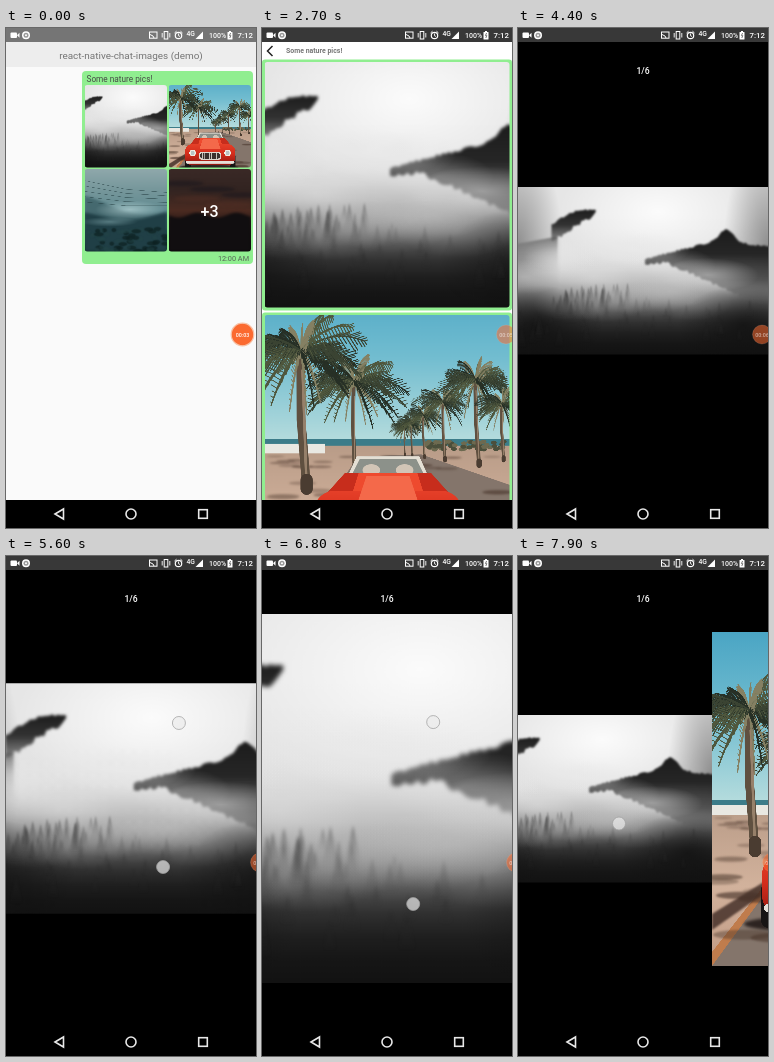
An HTML page with a canvas for the animation above (8 s loop, 250x500 px).

```html
<!DOCTYPE html>
<html lang="en">
<head>
<meta charset="utf-8">
<title>Chat images</title>
<style>
  html, body { margin: 0; width: 100%; height: 100%; overflow: hidden; background: #000; }
  canvas { display: block; width: 250px; height: 500px; }
</style>
</head>
<body>
<canvas id="stage"></canvas>
<script>
const W = 250, H = 500, LOOP = 8000, STEP = 100;
const BAR = 14, NAV = 472, GREEN = '#90ee90', WHITE = '#fff';
const OPEN_LIST = 2100, OPEN_VIEWER = 4000, PINCH = 5100, RELEASE = 6500, SWIPE = 7700;
const stage = document.getElementById('stage');
const dpr = Math.max(1, window.devicePixelRatio || 1);
stage.width = W * dpr;
stage.height = H * dpr;
const ctx = stage.getContext('2d');

const ramp = (t, start, length) => Math.min(1, Math.max(0, (t - start) / length));
const smooth = p => p * p * (3 - 2 * p);
const mix = (a, b, p) => a + (b - a) * p;

function random(seed) {
  return () => (seed = (seed * 16807) % 2147483647) / 2147483647;
}

function trace(c, points) {
  c.beginPath();
  points.forEach(([x, y]) => c.lineTo(x, y));
}

function shape(c, color, points) {
  c.fillStyle = color;
  trace(c, points);
  c.fill();
}

function line(c, color, width, points) {
  c.strokeStyle = color;
  c.lineWidth = width;
  trace(c, points);
  c.stroke();
}

function rect(c, color, x, y, w, h, r = 0) {
  c.fillStyle = color;
  c.beginPath();
  c.roundRect(x, y, w, h, r);
  c.fill();
}

function disc(c, color, x, y, rx, ry = rx) {
  c.fillStyle = color;
  c.beginPath();
  c.ellipse(x, y, rx, ry, 0, 0, 7);
  c.fill();
}

// Area between two curves.
function band(c, color, x0, x1, top, bottom) {
  const upper = [], lower = [];
  for (let x = x0; x <= x1; x += 2) {
    upper.push([x, top(x)]);
    lower.unshift([x, bottom(x)]);
  }
  shape(c, color, upper.concat(lower));
}

function blurred(c, radius, paint) {
  c.filter = `blur(${radius}px)`;
  paint();
  c.filter = 'none';
}

function blend(gradient, colors) {
  colors.forEach((color, i) => gradient.addColorStop(i / (colors.length - 1), color));
  return gradient;
}

const fall = (c, y0, y1, ...colors) => blend(c.createLinearGradient(0, y0, 0, y1), colors);

function glow(c, rgb, alpha, x, y, rx, ry) {
  c.save();
  c.translate(x, y);
  c.scale(rx, ry);
  disc(c, blend(c.createRadialGradient(0, 0, 0, 0, 0, 1),
    [alpha, alpha * 0.5, 0].map(a => `rgba(${rgb},${a})`)), 0, 0, 1);
  c.restore();
}

function text(str, x, y, size, color, { weight = 400, align = 'left' } = {}) {
  ctx.font = `${weight} ${size}px Roboto, sans-serif`;
  ctx.textAlign = align;
  ctx.fillStyle = color;
  ctx.fillText(str, x, y);
}

function makePhoto(w, h, paint) {
  const scale = 3, image = document.createElement('canvas');
  image.width = w * scale;
  image.height = h * scale;
  const c = image.getContext('2d');
  c.scale(scale, scale);
  paint(c, w, h);
  return { image, w, h, scale };
}

function paintMist(c, w, h) {
  const rnd = random(71);
  const rough = size => (rnd() - 0.5) * size;
  const greys = Array.from({ length: 17 }, (_, i) => {
    const v = 15 + 215 / (1 + Math.exp((i / 16 - 0.68) * 13));
    return `rgb(${v},${v},${v})`;
  });
  rect(c, fall(c, 0, h, ...greys), 0, 0, w, h);
  glow(c, '255,255,255', 0.85, 140, 25, 100, 60);
  for (const x of [0, w]) glow(c, '0,0,0', 0.38, x, 60, 45, 110);
  for (const x of [20, 225]) glow(c, '15,15,15', 0.75, x, 138, 65, 40);

  blurred(c, 3, () => {
    band(c, fall(c, 45, 85, '#666', 'rgba(150,150,150,0)'), -4, 40, x => 57 - x * 0.18, () => 85);
    band(c, fall(c, 22, 55, '#1c1c1c', '#333', 'rgba(90,90,90,.6)'), 34, 78,
      x => 23 + 0.012 * (70 - x) ** 2 + rough(2), x => 55 - (x - 34) * 0.64 + rough(5));
    const peak = x => 72 - 17 * ramp(x, 127, 66) - 13 * Math.exp(-(((x - 208) / 9) ** 2)) + 5 * ramp(x, 215, 35);
    band(c, fall(c, 42, 118, '#1c1c1c', '#262626', 'rgba(60,60,60,.75)', 'rgba(100,100,100,0)'), 127, 254,
      x => peak(x) + rough(2), x => 76 + 42 * ramp(x, 150, 90) + rough(4));
  });
  for (let i = 0; i < 10; i++) glow(c, '232,232,232', 0.32, rnd() * 165, 58 + rnd() * 34, 38, 17);
  glow(c, '215,215,215', 0.55, 190, 88, 50, 17);

  blurred(c, 2, () => {
    for (let i = 0; i < 90; i++) {
      const near = i % 2;
      const x = near ? rnd() * w : 35 + rnd() * 75;
      const y = near ? 106 + rnd() * 36 : 93 + rnd() * 18 + Math.abs(x - 95) * 0.15;
      const size = 9 + rnd() * 13, spread = size * 0.22;
      shape(c, fall(c, y, y + size, `rgba(30,30,30,${near ? 0.35 : 0.5})`, 'rgba(50,50,50,0)'),
        [[x, y], [x + spread, y + size], [x - spread, y + size]]);
    }
  });
  for (let i = 0; i < 9; i++) glow(c, '215,215,215', 0.17, 45 + rnd() * 150, 100 + rnd() * 20, 40, 17);
}

function palm(c, x, y, r, baseX, baseY, trunk, seed) {
  const rnd = random(seed);
  c.lineCap = 'round';
  line(c, '#5f5040', trunk, [[x, y], [(x + baseX) / 2 - trunk * 0.3, (y + baseY) / 2], [baseX, baseY]]);
  line(c, '#96806a', trunk * 0.3, [[x + trunk * 0.2, y + r * 0.3], [baseX, baseY]]);
  line(c, '#4a3c31', trunk * 1.4, [[baseX, baseY - trunk], [baseX, baseY]]);
  const colors = ['#273026', '#3b4433', '#50583e', '#858063'], fronds = 26;
  for (let i = 0; i < fronds; i++) {
    const a = i * 2.4 + rnd() * 0.3;
    const len = r * (0.65 + rnd() * 0.5);
    const ex = Math.cos(a) * len, ey = Math.sin(a) * len * 0.75 + r * 0.25;
    const cx = ex * 0.5, cy = ey * 0.5 - r * 0.3;
    const color = colors[i % colors.length];
    let from = [x, y];
    for (let u = 0; u <= 1; u += 1 / 18) {
      const px = x + 2 * u * (1 - u) * cx + u * u * ex;
      const py = y + 2 * u * (1 - u) * cy + u * u * ey;
      const leaf = r * (0.12 + rnd() * 0.16) * Math.sin(Math.PI * (0.15 + u * 0.8));
      line(c, color, r * 0.02, [from, [px, py]]);
      line(c, color, r * 0.017, [[px, py], [px + Math.cos(a) * leaf * 0.7, py + leaf]]);
      line(c, color, r * 0.014, [[px, py], [px + Math.cos(a) * leaf, py - leaf * 0.3]]);
      from = [px, py];
    }
  }
}

function paintCar(c, x) {
  const taper = (color, y0, half0, y1, half1) =>
    shape(c, color, [[x - half0, y0], [x + half0, y0], [x + half1, y1], [x - half1, y1]]);
  const pair = (gap, paint) => [-gap, gap].forEach(dx => paint(x + dx));
  blurred(c, 5, () => disc(c, 'rgba(30,22,20,.85)', x - 4, 292, 90, 9));
  pair(68, px => rect(c, '#171414', px - 9, 250, 18, 46, 8));
  taper('#e4dfd4', 186, 32, 206, 41);
  taper('#8c918a', 189, 29, 205, 37);
  pair(17, px => disc(c, '#d2c5b6', px, 200, 9, 6));
  taper('#c72d1c', 203, 44, 232, 70);
  taper('#ee4a2e', 203, 30, 235, 40);
  rect(c, fall(c, 216, 286, '#e8432b', '#d42d1c', '#8f1710'), x - 76, 221, 152, 64, 22);
  taper('#f4694a', 206, 22, 236, 32);
  pair(53, px => {
    disc(c, '#f0ece3', px, 248, 10);
    disc(c, '#b9c4c4', px, 248, 6);
  });
  rect(c, '#ddd8d0', x - 34, 244, 68, 25, 10);
  rect(c, '#39302e', x - 30, 248, 60, 17, 7);
  for (let dx = -24; dx <= 24; dx += 7) rect(c, '#c9c4bd', x + dx, 248, 2, 17);
  rect(c, '#e4dfd8', x - 74, 272, 148, 8, 4);
}

function paintBeach(c, w, h) {
  const rnd = random(8);
  rect(c, fall(c, 0, 170, '#4aa5c4', '#72bdd0', '#b5dcdd'), 0, 0, w, 172);
  rect(c, '#3c7c89', 0, 168, w, 7);
  rect(c, fall(c, 175, h, '#b99c88', '#d2b29c', '#c09a84'), 0, 175, w, h);
  rect(c, '#e9e8e2', 0, 173, 62, 10);
  shape(c, '#84756b', [[95, 186], [160, 184], [w, 215], [w, h], [0, h], [50, 256]]);
  shape(c, '#c07c4c', [[0, 320], [58, 246], [60, 252], [0, 334]]);
  blurred(c, 3, () => {
    band(c, 'rgba(62,42,36,.8)', 0, 58, x => 282 - x * 0.62, x => 298 - x * 0.7);
    for (let i = 0; i < 45; i++) {
      const depth = rnd() ** 2;
      disc(c, `rgba(72,52,42,${0.25 + rnd() * 0.4})`, rnd() * w, 186 + depth * 120, 9 + depth * 22, 1 + depth * 4);
    }
  });
  // Scrub along the shore.
  for (let i = 0; i < 70; i++) disc(c, i % 2 ? '#4b4f3b' : '#6d6a50', 165 + rnd() * 85, 171 + rnd() * 8, 3, 2);

  for (let i = 4; i >= 0; i--) {
    const k = 0.6 ** i, x = 132 + 83 * k;
    palm(c, x, 164 - 57 * k, 12 + 28 * k, x + 4 * k, 183 + 12 * k, 1 + 3 * k, 33 + i);
  }
  palm(c, 242, 132, 30, 244, 190, 3, 21);
  palm(c, 91, 109, 54, 92, 200, 4, 52);
  palm(c, 37, 78, 68, 43, 219, 9, 64);
  paintCar(c, 126);
}

function paintStorm(c, w, h) {
  const rnd = random(12);
  rect(c, fall(c, 0, h, '#8fa8ab', '#76979b', '#628b91', '#2d5159', '#0d2023'), 0, 0, w, h);
  blurred(c, 10, () => {
    band(c, '#45696f', 0, w, x => 85 + 26 * Math.sin(x / 60 - 0.9), () => 145);
    band(c, '#203f46', 0, w, x => 114 + 10 * Math.sin(x / 40 - 1), () => h);
  });
  glow(c, '180,210,212', 0.7, 110, 98, 85, 22);
  glow(c, '140,180,185', 0.5, 60, 128, 70, 12);
  blurred(c, 4, () => {
    for (let i = 0; i < 70; i++) {
      disc(c, i % 2 ? 'rgba(13,33,34,.7)' : 'rgba(35,68,70,.5)', rnd() * w, 145 + rnd() * 55, 5 + rnd() * 7, 5);
    }
  });
  for (let i = 0; i < 5; i++) {
    line(c, 'rgba(35,60,64,.55)', 1, [[0, 28 + i * 13], [100, 49 + i * 10], [w, 57 + i * 8]]);
  }
}

function paintDusk(c, w, h) {
  rect(c, fall(c, 0, h, '#3a2926', '#322421', '#4b2b21', '#1c1212', '#080708'), 0, 0, w, h);
  blurred(c, 10, () => {
    for (let i = 0; i < 5; i++) {
      disc(c, i % 2 ? 'rgba(80,46,36,.5)' : 'rgba(32,27,30,.7)', 30 + i * 38, 35 + (i * 37) % 60, 55, 7);
    }
    band(c, '#110e10', 0, w, x => 112 + 6 * Math.sin(x / 15), () => h);
  });
}

const mist = makePhoto(250, 167, paintMist);
const beach = makePhoto(250, 334, paintBeach);
const storm = makePhoto(200, 200, paintStorm);
const dusk = makePhoto(200, 200, paintDusk);

// Fills the box with the photo, cropped around its middle.
function cover(photo, x, y, w, h, radius = 0) {
  const s = Math.max(w / photo.w, h / photo.h);
  const sw = w / s, sh = h / s, k = photo.scale;
  ctx.save();
  ctx.beginPath();
  ctx.roundRect(x, y, w, h, radius);
  ctx.clip();
  ctx.drawImage(photo.image, (photo.w - sw) / 2 * k, (photo.h - sh) / 2 * k, sw * k, sh * k, x, y, w, h);
  ctx.restore();
}

function insideScreen(paint) {
  ctx.save();
  ctx.beginPath();
  ctx.rect(0, BAR, W, NAV - BAR);
  ctx.clip();
  paint();
  ctx.restore();
}

const pressed = (t, start) => mix(1, 0.87, ramp(t, start, 400));

function drawChat(t) {
  rect(ctx, '#fafafa', 0, BAR, W, NAV - BAR);
  rect(ctx, '#ededed', 0, BAR, W, 25);
  text('react-native-chat-images (demo)', 125, 31, 9.95, '#757575', { align: 'center' });
  rect(ctx, GREEN, 76, 43, 171, 193, 4);
  text('Some nature pics!', 80.5, 53.5, 8.25, '#474b47');
  [mist, beach, storm, dusk].forEach((photo, i) => {
    ctx.globalAlpha = photo === dusk ? 1 : pressed(t, 1300);
    cover(photo, 78.5 + (i % 2) * 84, 57 + (i >> 1) * 84, 82.5, 82.5, 3);
  });
  text('+3', 203.5, 189, 16, WHITE, { weight: 500, align: 'center' });
  text('12:00 AM', 243, 233, 7.3, '#566356', { align: 'right' });
}

function drawList(t) {
  const hidden = 1 - ramp(t, OPEN_LIST, 400);
  ctx.translate(0, (NAV - BAR) * hidden ** 2);
  rect(ctx, WHITE, 0, BAR, W, H);
  line(ctx, '#222', 1.5, [[10.5, 18], [5.5, 23], [10.5, 28]]);
  text('Some nature pics!', 24, 25, 6.95, '#777', { weight: 700 });
  [mist, beach].forEach((photo, i) => {
    const y = 31.5 + i * 253;
    rect(ctx, GREEN, 0, y, W, 251, 3);
    ctx.globalAlpha = pressed(t, 3300);
    cover(photo, 2.5, y + 2.5, 245, 245.5, 3);
    ctx.globalAlpha = 1;
  });
}

const spread = t => ramp(t, PINCH, RELEASE - PINCH) ** 1.5;
const squeeze = t => smooth(ramp(t, RELEASE, 800));

function drawViewer(t) {
  ctx.globalAlpha = ramp(t, OPEN_VIEWER, 400);
  rect(ctx, '#000', 0, BAR, W, NAV - BAR);
  const zoom = 1 + 1.75 * (spread(t) - squeeze(t));
  const swipe = 56 * ramp(t, SWIPE, 200) ** 1.6;
  const w = W * zoom, h = 168 * zoom;
  cover(mist, 125 - w / 2 - swipe, 242.5 - h / 2, w, h);
  if (swipe) cover(beach, W - swipe, 76, W, 334);
  text('1/6', 125, 46, 8.6, WHITE, { weight: 500, align: 'center' });
}

function drawTouch(x, y) {
  disc(ctx, 'rgba(235,235,235,.7)', x, y, 6.5);
  ctx.strokeStyle = 'rgba(160,160,160,.75)';
  ctx.lineWidth = 1;
  ctx.stroke();
}

function drawTouches(t) {
  if (t > PINCH && t <= 6900) {
    const shut = squeeze(t), reach = 40 + 150 * spread(t) - 313 * shut;
    for (const side of [-1, 1]) {
      drawTouch(165 - 12 * shut - side * reach * 0.11, 239 + 57 * shut + side * reach);
    }
  }
  if (t > SWIPE) drawTouch(mix(158, 101, ramp(t, SWIPE, 200)), 267.5);
}

function drawTimer(t) {
  const idle = ramp(t, OPEN_LIST, 500);
  const x = 236.5 + 7.5 * idle + 10 * ramp(t, PINCH, 500);
  const r = mix(11.3, 9.5, idle);
  ctx.globalAlpha = mix(1, 0.55, idle);
  disc(ctx, '#fb6a30', x, 306.5, r);
  ctx.strokeStyle = '#f7c3a8';
  ctx.lineWidth = mix(1.2, 0.3, idle);
  ctx.stroke();
  text('00:0' + (3 + Math.floor((t + 400) / 1300)), x, 308.7, 5.4, WHITE, { weight: 500, align: 'center' });
  ctx.globalAlpha = 1;
}

function drawStatus(t) {
  rect(ctx, t > OPEN_LIST ? '#383838' : '#757575', 0, 0, W, BAR);
  rect(ctx, WHITE, 4.5, 4.5, 6.5, 5.5, 1);
  shape(ctx, WHITE, [[11, 7.2], [13.5, 4.8], [13.5, 9.8]]);
  [WHITE, '#999', WHITE].forEach((color, i) => disc(ctx, color, 20, 7.2, 4 - 1.5 * i));

  ctx.strokeStyle = WHITE;
  ctx.lineWidth = 1;
  ctx.strokeRect(143.5, 4, 7.5, 6.2);
  line(ctx, WHITE, 1, [[144, 6.5], [147, 8], [148, 10]]);
  ctx.strokeRect(158.2, 3.5, 3.6, 7.5);
  for (const x of [156.2, 163.8]) line(ctx, WHITE, 0.9, [[x, 5], [x, 9.5]]);
  ctx.lineWidth = 1.2;
  ctx.beginPath();
  ctx.arc(172.5, 7.5, 3.2, 0, 7);
  ctx.stroke();
  line(ctx, WHITE, 0.9, [[172.5, 5.5], [172.5, 7.7], [174, 8.5]]);
  for (const side of [-1, 1]) line(ctx, WHITE, 1, [[172.5 + side * 4, 5], [172.5 + side * 2, 3.2]]);
  text('4G', 180.5, 8, 6.8, WHITE, { weight: 500 });
  shape(ctx, WHITE, [[189.5, 11], [197, 11], [197, 3.5]]);
  text('100%', 203, 10, 7, WHITE, { weight: 500 });
  rect(ctx, WHITE, 221.5, 4, 5, 7.5, 0.6);
  rect(ctx, WHITE, 223, 3, 2, 1.5);
  line(ctx, '#777', 1, [[224.6, 5], [223.4, 7.6], [224.8, 7.6], [223.8, 10]]);
  text('7:12', 231.5, 10, 7.8, WHITE, { weight: 500 });
}

function drawNav() {
  rect(ctx, '#000', 0, NAV, W, H - NAV);
  ctx.strokeStyle = '#e8e8e8';
  ctx.lineWidth = 1.6;
  trace(ctx, [[49, 486], [57.5, 481], [57.5, 491]]);
  ctx.closePath();
  ctx.stroke();
  ctx.beginPath();
  ctx.arc(125, 486, 5, 0, 7);
  ctx.stroke();
  ctx.strokeRect(192.7, 481.7, 8.6, 8.6);
}

function draw(t) {
  ctx.setTransform(dpr, 0, 0, dpr, 0, 0);
  if (t < OPEN_LIST + 400) drawChat(t);
  ctx.globalAlpha = 1;
  if (t > OPEN_LIST && t < OPEN_VIEWER + 400) insideScreen(() => drawList(t));
  if (t > OPEN_VIEWER) insideScreen(() => drawViewer(t));
  drawTouches(t);
  drawTimer(t);
  drawStatus(t);
  drawNav();
}

function tick() {
  const t = performance.now() % LOOP;
  draw(Math.floor(t / STEP) * STEP);
  requestAnimationFrame(tick);
}
tick();
</script>
</body>
</html>
```
